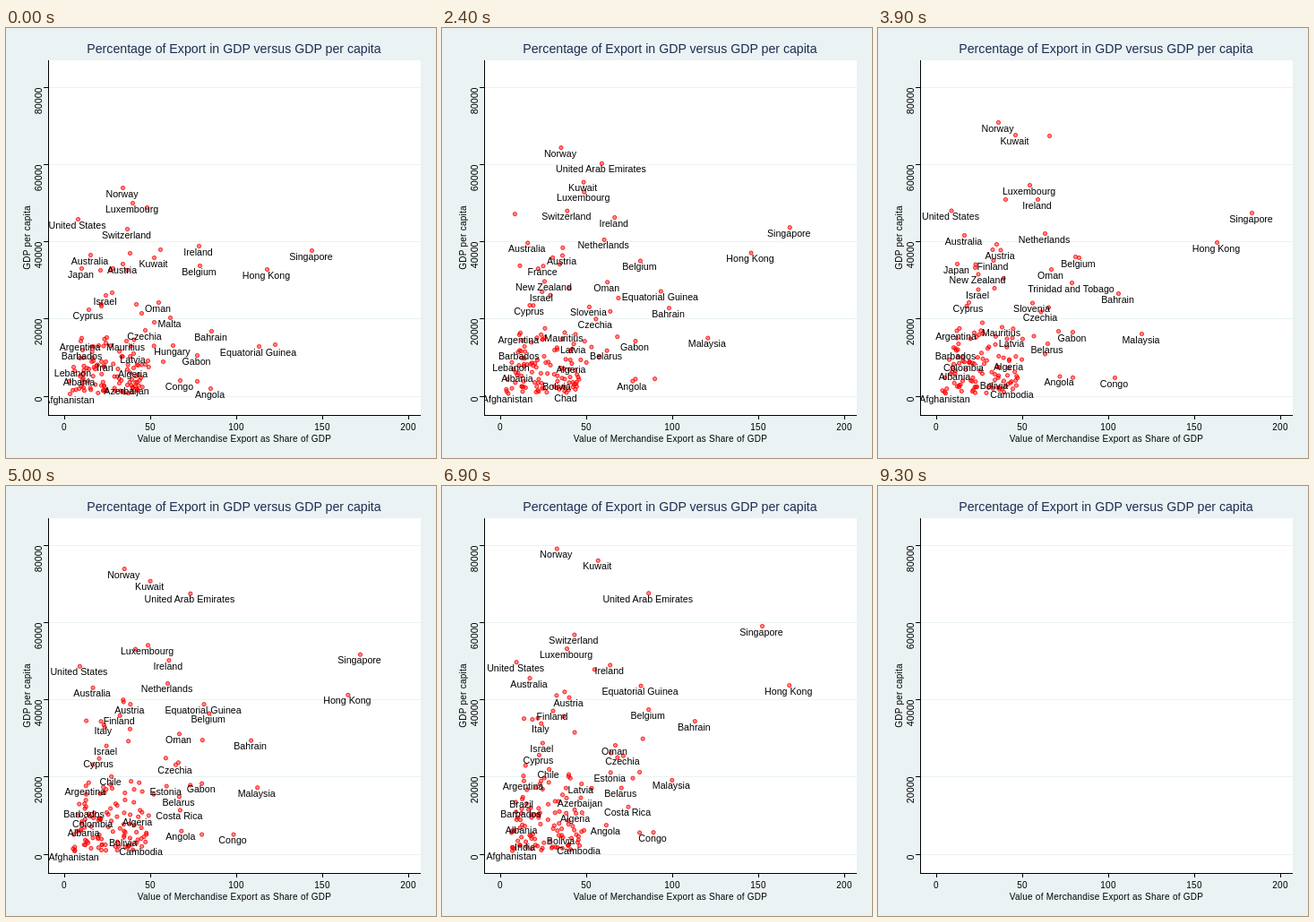
An HTML page for the animation above (10000 ms loop, 480 by 480 pixels).

```html
<!DOCTYPE html>
<html lang="en">
<head>
<meta charset="utf-8">
<title>Export share and GDP per capita</title>
<style>
  html, body { margin: 0; width: 100%; height: 100%; overflow: hidden; background: #eaf2f3; }
  svg { display: block; width: 480px; height: 480px; }
  text { font-family: "Liberation Sans", Arial, sans-serif; text-anchor: middle; }
  .title { font-size: 14.16px; fill: #1e2d53; }
  .axis { font-size: 10px; letter-spacing: .24px; }
  .y { font-size: 10.67px; letter-spacing: 0; text-anchor: end; }
  #labels text { font-size: 10.67px; }
  circle { fill: #f00; fill-opacity: .45; stroke: #f00; stroke-opacity: .85; }
</style>
</head>
<body>
<svg viewBox="0 0 480 480">
  <clipPath id="plot"><rect x="48" y="36" width="415" height="396"/></clipPath>
  <rect width="480" height="480" fill="#eaf2f3"/>
  <rect x="48" y="36" width="415" height="397" fill="#fff"/>
  <g id="axes"></g>
  <path d="M47.5 36V433M47 432.5H463" stroke="#000" fill="none"/>
  <text class="title" x="254.5" y="28">Percentage of Export in GDP versus GDP per capita</text>
  <text class="axis" x="255" y="462">Value of Merchandise Export as Share of GDP</text>
  <text class="axis" transform="translate(27 234) rotate(-90)">GDP per capita</text>
  <g clip-path="url(#plot)"><g id="dots"></g><g id="labels"></g></g>
</svg>
<script>
const $ = id => document.getElementById(id);

function make(parent, tag, attrs, text = '') {
  const el = document.createElementNS('http://www.w3.org/2000/svg', tag);
  for (const k in attrs) el.setAttribute(k, attrs[k]);
  el.textContent = text;
  return parent.appendChild(el);
}

for (let i = 0; i < 5; i++) {
  const x = 65 + 96 * i, y = Math.floor(411 - 86.2 * i) + .5;
  make($('axes'), 'path', { d: `M48 ${y}H463`, stroke: '#eaf2f3' });
  make($('axes'), 'path', { d: `M42 ${y}H47M${x + .5} 433V437`, stroke: '#000' });
  make($('axes'), 'text', { class: 'axis', x, y: 449 }, 50 * i);
  make($('axes'), 'text', { class: 'axis y', transform: `translate(40 ${y}) rotate(-90)` }, 20000 * i);
}

const SPAN = 7.8, BASE = 411;
const mix = (a, b, f) => a + (b - a) * f;
let seed = 29;
const rand = () => (seed = seed * 16807 % 2147483647) / 2147483647;

const countries = [];

function add(name, at, shown) {
  const dot = make($('dots'), 'circle', { r: 2.1 });
  const label = make($('labels'), 'text', {}, name);
  countries.push({ name, at, shown, dot, label, half: label.getComputedTextLength() / 2 });
}

// Waypoints are evenly spaced in time; a single one follows the common growth.
function track(name, ...p) {
  if (p.length === 2) p.push(p[0] + 8, BASE - (BASE - p[1]) * 1.5);
  const legs = p.length / 2 - 1;
  const at = t => {
    const s = Math.min(t, SPAN) / SPAN * legs;
    const k = Math.min(Math.floor(s), legs - 1);
    const f = s - k + Math.max(0, t - SPAN) * .04;
    return [mix(p[2 * k], p[2 * k + 2], f), mix(p[2 * k + 1], p[2 * k + 3], f)];
  };
  add(name, at, sparse => !sparse || name < 'D');
}

const visitor = (name, x, y) => add(name, () => [x, y], sparse => sparse);

track('Norway', 130,178, 134,105, 126,59);
track('Kuwait', 165,256, 153,119, 180,72);
track('United Arab Emirates', 157,200, 191,120, 242,119);
track('Luxembourg', 141,195, 169,175, 130,183);
track('Ireland', 215,243, 178,191, 190,202);
track('Netherlands', 172,247, 186,229, 165,197);
track('Singapore', 341,248, 417,206, 339,141);
track('Hong Kong', 291,269, 378,239, 390,217);
track('Oman', 170,306, 193,269, 193,295);
track('Bahrain', 229,338, 268,296, 286,252);
track('Equatorial Guinea', 282,355, 220,255, 222,213);
track('Trinidad and Tobago', 165,328, 216,284, 226,281);
track('Malaysia', 300,353, 294,341, 245,324);
track('Congo', 194,393, 264,390, 227,385);

track('Switzerland', 135,224, 149,158);
track('United States', 80,213, 83,194);
track('Australia', 94,253, 98,209);
track('', 138,251, 126,231);
track('Austria', 130,263, 143,232);
track('Belgium', 216,265, 232,247);
track('Italy', 105,270, 111,264);
track('Finland', 135,270, 122,248);
track('France', 119,268, 98,259);
track('Iceland', 116,270, 139,224);
track('Japan', 84,268, 92,258);
track('Israel', 111,298, 112,285);
track('Cyprus', 92,314, 110,298);
track('New Zealand', 118,295, 105,254);
track('Saudi Arabia', 145,308, 134,250);
track('South Korea', 106,310, 153,270);
track('Greece', 106,308, 91,312);
track('Malta', 183,323, 197,300);
track('Slovenia', 151,318, 193,295);
track('Czechia', 155,337, 208,296);
track('Hungary', 186,354, 216,322);
track('Estonia', 155,375, 192,312);
track('Gabon', 213,365, 221,313);
track('Argentina', 83,349, 92,326);
track('Kazakhstan', 147,376, 140,317);
track('Latvia', 142,363, 157,328);
track('Belarus', 175,372, 203,332);
track('Azerbaijan', 135,398, 157,341);
track('Costa Rica', 158,371, 214,356);
track('Barbados', 85,359, 89,360);
track('Angola', 228,402, 177,375);

track('Eswatini', 213,394);
track('Chile', 112,345);
track('Croatia', 103,354);
track('Mauritius', 134,349);
track('Brazil', 82,368);
track('Iran', 111,372);
track('Lebanon', 75,378);
track('Colombia', 92,380);
track('Algeria', 142,379);
track('Albania', 82,388);
track('China', 126,391);
track('Cape Verde', 70,394);
track('Mongolia', 140,392);
track('Bolivia', 126,396);
track('India', 86,401);
track('Cambodia', 146,404);
track('Chad', 136,407);
track('Afghanistan', 71,408);

// For a short spell most countries are missing and a few others stand in.
visitor('Denmark', 122,228);
visitor('Ireland', 165,252);
visitor('Iceland', 148,270);
visitor('Italy', 104,271);
visitor('Germany', 120,280);
visitor('Hungary', 247,298);
visitor('Pakistan', 97,301);
visitor('Kyrgyzstan', 123,313);
visitor('Iran', 103,349);
for (let i = 0; i < 16; i++) visitor('', 100 + 110 * rand(), 255 + 85 * rand());

// The dense cluster of poorer countries.
for (let i = 0; i < 85; i++) {
  const rise = 3 + 60 * rand() ** 1.6;
  const x = 72 + 80 * rand() ** 1.15 + rise * .25;
  const phase = 6.28 * rand(), rate = .4 + .5 * rand();
  const at = t => [
    x + 4 * Math.sin(phase + rate * t),
    409 - rise * (1 + .05 * t) + 1.5 * Math.cos(phase + rate * t)
  ];
  add('', at, sparse => !sparse || i < 55);
}

countries.sort((a, b) => a.name < b.name ? -1 : a.name > b.name ? 1 : 0);

// Labels are placed in alphabetical order; one that would overlap is left out.
function render(t) {
  const sparse = t > 5.75 && t < 6.35, placed = [];
  for (const { name, at, shown, dot, label, half } of countries) {
    const [x, y] = at(t);
    const on = t < 9.25 && shown(sparse);
    const clear = on && name && placed.every(p => Math.abs(p.x - x) >= p.half + half || Math.abs(p.y - y) >= 10);
    if (clear) placed.push({ x, y, half });
    dot.style.display = on ? '' : 'none';
    dot.setAttribute('cx', x + .5);
    dot.setAttribute('cy', y + .5);
    label.style.display = clear ? '' : 'none';
    label.setAttribute('x', x - .5);
    label.setAttribute('y', y + 10.5);
  }
}

let start, last = -1;
function frame(now) {
  start ??= now;
  const step = Math.floor((now - start) % 10000 / 100);
  if (step !== last) render((last = step) / 10);
  requestAnimationFrame(frame);
}
render(0);
requestAnimationFrame(frame);
</script>
</body>
</html>
```
